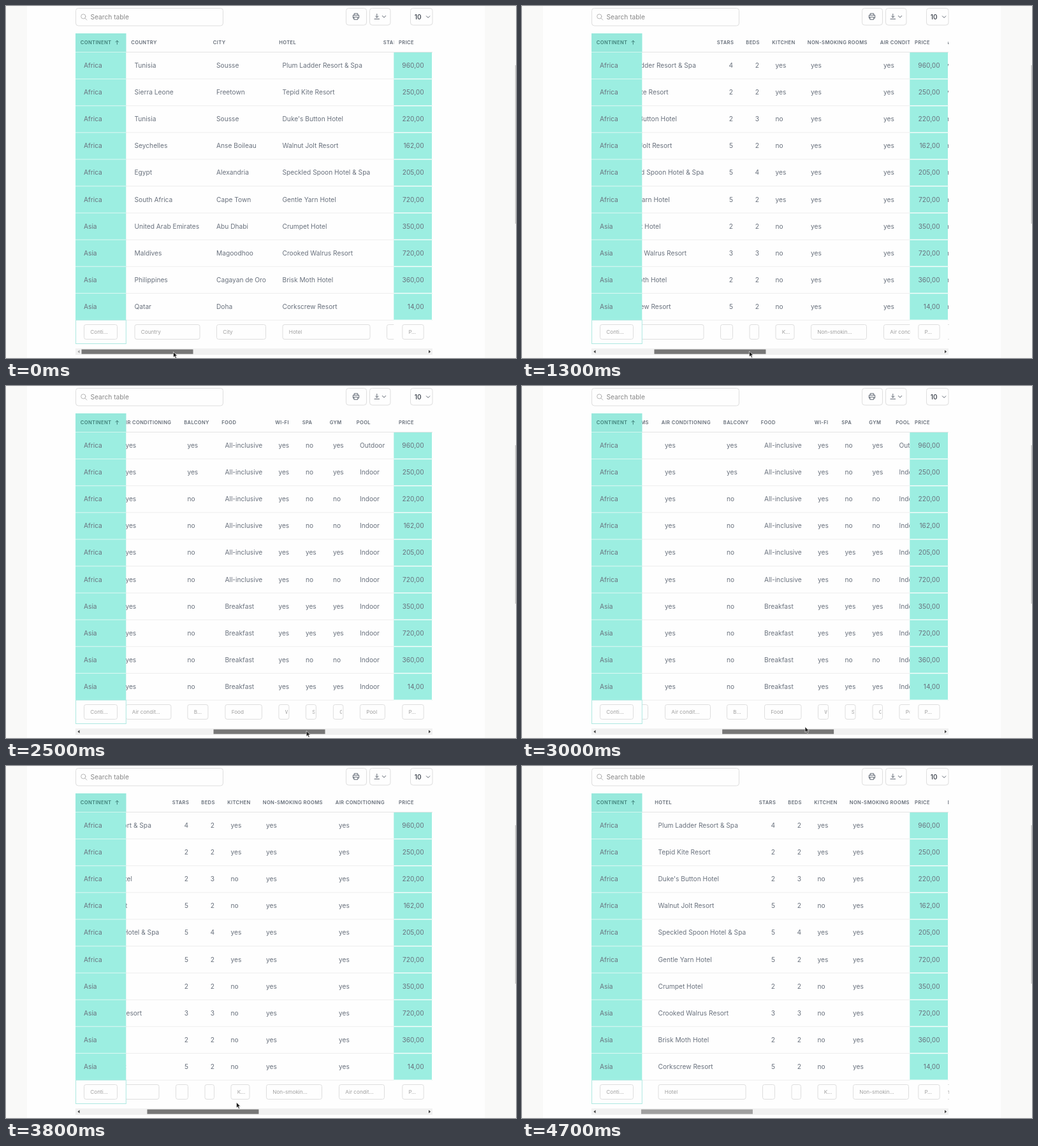
Write an HTML page that moves like this. It is 800 px wide and 553 px high and loops after 5700 ms.

```html
<!DOCTYPE html>
<html lang="en">
<head>
<meta charset="utf-8">
<title>Hotel table</title>
<style>
  html, body { margin: 0; width: 100%; height: 100%; overflow: hidden; background: #fefefe; }
  svg { display: block; width: 800px; height: 553px; }
  text { font: 10.2px Inter, sans-serif; fill: #69717d; white-space: pre; }
  text.head { font-size: 7.6px; font-weight: 600; letter-spacing: .35px; fill: #656d78; }
  text.hint { font-size: 8.2px; fill: #a0a0a0; }
  .field { fill: #fefefe; stroke: #dedede; }
  .icon { fill: none; stroke: #5c6470; stroke-linecap: round; stroke-linejoin: round; }
</style>
</head>
<body>
<svg id="stage" viewBox="0 0 800 553">
  <defs>
    <clipPath id="window"><rect x="188" y="43" width="482" height="490"/></clipPath>
  </defs>
</svg>
<script>
const stage = document.getElementById('stage');
const LOOP = 5700, STEP = 100, LAST = 4700;
const ROW = 42.1, TOP = 72.5, BOTTOM = 493.5, ROWS = 10;
const TEAL = '#9ceee1';

function add(parent, tag, attrs, content) {
  const node = document.createElementNS('http://www.w3.org/2000/svg', tag);
  for (const name in attrs) node.setAttribute(name, attrs[name]);
  if (content !== undefined) node.textContent = content;
  return parent.appendChild(node);
}
const rect = (parent, x, y, width, height, fill) => add(parent, 'rect', { x, y, width, height, fill });
const path = (parent, d, attrs) => add(parent, 'path', { d, ...attrs });
const label = (parent, x, y, content, attrs = {}) => add(parent, 'text', { x, y, ...attrs }, content);
const box = (parent, x, y, width, height, rx) => add(parent, 'rect', { class: 'field', x, y, width, height, rx });

function filter(parent, x, width, hint) {
  box(parent, x + .5, 500.5, width - 1, 23, 3);
  // A nested svg clips a hint that is wider than its field.
  const inner = add(parent, 'svg', { x, y: 500, width: width - 2.5, height: 24 });
  label(inner, 10.3, 15, hint, { class: 'hint' });
}

function column(parent, x, width, title, hint, values, alignRight) {
  label(parent, x - 5.2, 60.2, title, { class: 'head' });
  values.forEach((value, i) => label(parent, alignRight ? x + width : x, 97 + i * ROW, value,
    { 'text-anchor': alignRight ? 'end' : 'start' }));
  filter(parent, x, width, hint);
}

function rowLines(parent, x, width, color, weight) {
  for (let i = 1; i <= ROWS; i++)
    rect(parent, x, TOP + i * ROW - weight / 2, width, weight, color);
}

const list = text => text.split('|');
const repeat = (value, count = ROWS) => Array(count).fill(value);
const yesNo = flags => [...flags].map(flag => flag === 'y' ? 'yes' : 'no');

// Page background and its scrollbar
rect(stage, 0, 0, 800, 553, '#fefefe');
rect(stage, 0, 0, 33, 553, '#f9f9f8');
rect(stage, 751, 0, 49, 553, '#f9f9f8');
rect(stage, 798.7, 93, 1.3, 249, '#c4c4c4');

// Toolbar
box(stage, 109.5, 3.5, 231, 27.5, 4);
add(stage, 'circle', { class: 'icon', cx: 121.3, cy: 16.4, r: 3.6, style: 'stroke:#b5b5b5' });
path(stage, 'M124 19.2l2.8 2.8', { class: 'icon', style: 'stroke:#b5b5b5' });
label(stage, 132.5, 21, 'Search table', { style: 'fill:#888' });
box(stage, 533.5, 3.5, 32, 26.5, 4);
path(stage, 'M546.2 14.2v-2.4h5.6v2.4M546 19h-1.6v-4.6h9.2v4.6h-1.6M546.2 17.3h5.6v3.9h-5.6z', { class: 'icon' });
box(stage, 570.5, 3.5, 32.5, 26.5, 4);
path(stage, 'M581.8 12.5v5.4M579.6 16l2.2 2.2 2.2-2.2M578 20.4h7.6M590.3 15.4l2.7 2.7 2.7-2.7', { class: 'icon' });
box(stage, 634.5, 3.5, 34.5, 26.5, 4);
label(stage, 640.8, 21, '10', { style: 'fill:#333a44;font-weight:500' });
path(stage, 'M659.4 15.8l2.7 2.7 2.7-2.7', { class: 'icon' });

// Scrolling columns
rect(stage, 109, 72, 560, 1, '#e4e4e4');
rowLines(stage, 109, 560, '#eeeeee', 1);
const view = add(stage, 'g', { 'clip-path': 'url(#window)' });
const strip = add(view, 'g', {});
const food = [...repeat('All-inclusive', 6), ...repeat('Breakfast', 4)];
const hotels = list("Plum Ladder Resort & Spa|Tepid Kite Resort|Duke's Button Hotel|Walnut Jolt Resort|" +
  'Speckled Spoon Hotel & Spa|Gentle Yarn Hotel|Crumpet Hotel|Crooked Walrus Resort|Brisk Moth Hotel|Corkscrew Resort');
[
  [201.5, 103, 'COUNTRY', 'Country', list('Tunisia|Sierra Leone|Tunisia|Seychelles|Egypt|South Africa|United Arab Emirates|Maldives|Philippines|Qatar')],
  [330, 78, 'CITY', 'City', list('Sousse|Freetown|Sousse|Anse Boileau|Alexandria|Cape Town|Abu Dhabi|Magoodhoo|Cagayan de Oro|Doha')],
  [433.5, 138, 'HOTEL', 'Hotel', hotels],
  [597, 20, 'STARS', '', [...'4225552325'], true],
  [642.5, 15.5, 'BEDS', '', [...'2232422322'], true],
  [683.5, 30, 'KITCHEN', 'K…', yesNo('yynnyynnnn')],
  [739, 88, 'NON-SMOKING ROOMS', 'Non-smokin…', repeat('yes')],
  [853, 72, 'AIR CONDITIONING', 'Air condit…', repeat('yes')],
  [950, 33, 'BALCONY', 'B…', yesNo('yynnnnnnnn')],
  [1009, 58.5, 'FOOD', 'Food', food],
  [1093, 17, 'WI-FI', 'W', repeat('yes')],
  [1135.5, 17, 'SPA', 'S', yesNo('nnnnynyyny')],
  [1178.5, 16.5, 'GYM', 'G', yesNo('yynnynyyny')],
  [1220.5, 40, 'POOL', 'Pool', ['Outdoor', ...repeat('Indoor', 9)]],
].forEach(args => column(strip, ...args));

// Pinned price column
rect(stage, 608.3, 43, 59.7, 488, '#fefefe');
rect(stage, 608.3, 72, 60.7, 1, '#e4e4e4');
rect(stage, 608.3, 73, 59.7, BOTTOM - 73, TEAL);
rowLines(stage, 608.3, 59.7, '#f2fcfa', 1.5);
column(stage, 621.3, 34.4, 'PRICE', 'P…',
  list('960,00|250,00|220,00|162,00|205,00|720,00|350,00|720,00|360,00|14,00'), true);

// Pinned continent column
rect(stage, 109, 43, 79.3, BOTTOM - 43, TEAL);
rect(stage, 109, 43, 79.3, 29, '#97e9dc');
rect(stage, 109, 72, 79.3, 1, '#d2f5ef');
rowLines(stage, 109, 79.3, '#d5f7f1', 1.2);
add(stage, 'rect', { x: 109.5, y: 493.5, width: 78.8, height: 37, fill: '#fefefe', stroke: '#ade9e1' });
const continents = add(stage, 'g', {});
column(continents, 122, 53, 'CONTINENT', 'Conti…', [...repeat('Africa', 6), ...repeat('Asia', 4)]);
continents.querySelector('.head').style.fill = '#3f7f78';
path(stage, 'M174.3 60.2v-5.8M172 56.6l2.3-2.3 2.3 2.3', { class: 'icon', style: 'stroke:#3f7f78' });

// Horizontal scrollbar and pointer
rect(stage, 109, 538, 560, 10, '#f1f1f1');
const leftArrow = path(stage, 'M115.5 540.6v5l-3.2-2.5z');
path(stage, 'M663 540.6v5l3.2-2.5z', { fill: '#444' });
const thumb = rect(stage, 0, 539.5, 175, 7.2, '#777');
const pointer = path(stage, 'M0 0v8.6l2-1.8 1.5 3.2 1.5-.7-1.5-3.1h2.8z',
  { fill: '#1c1c1c', stroke: '#fff', 'stroke-width': .6 });

// Time, table scroll, pointer x, pointer y
const KEYS = [
  [0, 0, 262.5, 543.5], [600, 112, 303, 541], [700, 144, 312.5, 540.5], [1300, 286, 356.5, 542.5],
  [2000, 530, 444, 544.5], [2600, 672, 472, 541], [3000, 629, 444, 535.5],
  [3800, 331, 361.5, 528.5], [4300, 220, 333, 531], [4600, 220, 326, 562], [4700, 220, 326, 562],
];

// Cubic interpolation that is flat at turning points.
function track(time, field) {
  const slope = i => (KEYS[i + 1][field] - KEYS[i][field]) / (KEYS[i + 1][0] - KEYS[i][0]);
  const tangent = i => {
    if (i === 0 || i === KEYS.length - 1 || slope(i - 1) * slope(i) <= 0) return 0;
    return (KEYS[i + 1][field] - KEYS[i - 1][field]) / (KEYS[i + 1][0] - KEYS[i - 1][0]);
  };
  const next = KEYS.findIndex((key, i) => i > 0 && time <= key[0]);
  const i = next - 1, span = KEYS[next][0] - KEYS[i][0], u = (time - KEYS[i][0]) / span;
  const from = KEYS[i][field], to = KEYS[next][field];
  return from + (to - from) * u * u * (3 - 2 * u)
    + span * u * (1 - u) * (tangent(i) * (1 - u) - tangent(next) * u);
}

function draw() {
  const elapsed = performance.now() % LOOP;
  const time = Math.min(LAST, Math.floor(elapsed / STEP) * STEP);
  const scroll = track(time, 1);
  strip.setAttribute('transform', `translate(${-scroll} 0)`);
  thumb.setAttribute('x', 118.5 + scroll / 3.215);
  thumb.setAttribute('fill', time > 4300 ? '#a0a0a0' : '#777');
  leftArrow.setAttribute('fill', scroll > 0 ? '#444' : '#a5a5a5');
  pointer.setAttribute('transform', `translate(${track(time, 2)} ${track(time, 3)})`);
  requestAnimationFrame(draw);
}
draw();
</script>
</body>
</html>
```
